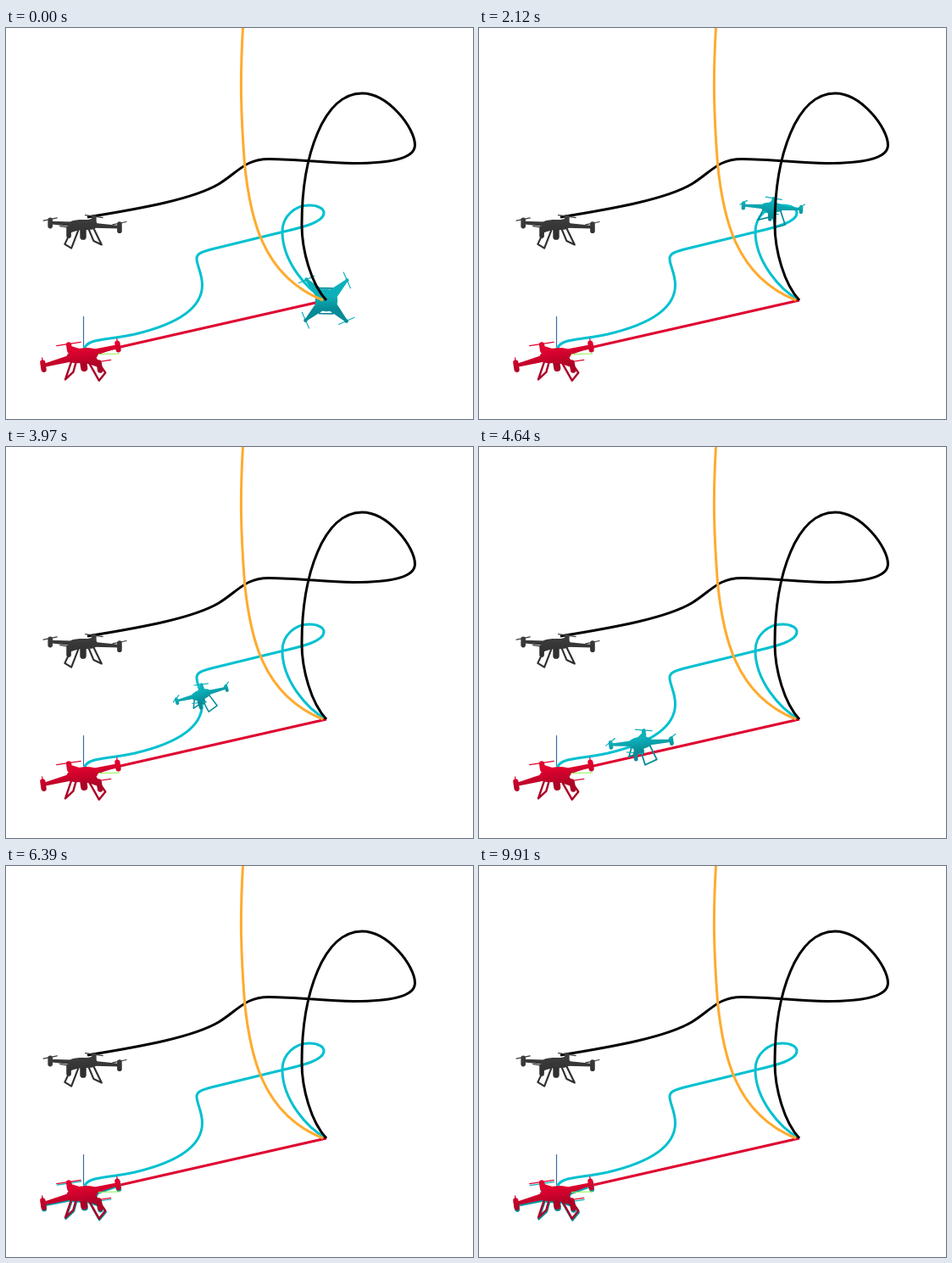
These frames come from a looping animation (551 px wide and 461 px high, 9.97 s). An HTML page with a canvas:

```html
<!DOCTYPE html>
<html lang="en">
<head>
<meta charset="utf-8">
<title>Drone trajectories</title>
<style>
html, body { margin: 0; width: 551px; height: 461px; overflow: hidden; background: #fff; }
canvas { display: block; }
</style>
</head>
<body>
<canvas id="stage" width="551" height="461"></canvas>
<script>
const ctx = document.getElementById('stage').getContext('2d');
const LOOP = 9970, DEG = Math.PI / 180;
const CYAN = { body: '#0db0ba', dark: '#078b96' };
const RED = { body: '#e0032f', dark: '#ab0226' };
const GREY = { body: '#3c3c3c', dark: '#303030' };

const flightPath = 'M378 321C355 309 326 275 326 240C326 222 341 209 358 209C368 209 375 213 375 218' +
  'C375 230 345 236 326 240.5L242 261C231 264 225 266 225 272C225 280 231.5 289 231.5 303' +
  'C231.5 335 190 352 152 361C130 365.5 112 367 103 369.5C95 372 91 376 90.5 388';
const flight = document.createElementNS('http://www.w3.org/2000/svg', 'path');
flight.setAttribute('d', flightPath);
const flightLength = flight.getTotalLength();

const tracks = {
  cyan: [flightPath, '#00c0d0'],
  red: ['M91 386L378 321', '#df0330'],
  black: ['M378 321C360 302 349 262 349 232C349 150 375 77 420 77C451 77 482.5 118 482.5 138' +
    'C482.5 155 450 159.5 410 159.5C375 159 345 154.5 310 154.5C282 154.5 274 170 251 184C222 201 165 212 96 223', '#000'],
  orange: ['M279.5 0C276 60 277 100 281.5 160C287.5 220 301 292 374 321', '#ffab2e']
};

// Attitude: radius, yaw, tilt towards the viewer, roll (degrees)
const redPose = [48, -19.5, 17.5, -8.6];
const greyPose = [43.5, -70, 10, 0];
// [time, distance flown, ...attitude]
const keys = [
  [1000, 0, 34, 46, 88, 0],
  [1390, 58, 33, 28, 24, 9],
  [2820, 213, 34.7, -13, 20, -5],
  [3970, 356, 30.5, 8, 20, -17.5],
  [5270, 493, 43, 7, 22, 1.4],
  [6400, flightLength, ...redPose]
];

// Smooth curve through timed rows, held at both ends
function sample(rows, time) {
  const last = rows.length - 1;
  const t = Math.min(Math.max(time, rows[0][0]), rows[last][0]);
  const i = Math.max(rows.findIndex(r => r[0] >= t) - 1, 0);
  const a = rows[i], b = rows[i + 1];
  const before = rows[Math.max(i - 1, 0)], after = rows[Math.min(i + 2, last)];
  const span = b[0] - a[0], p = (t - a[0]) / span, q = 1 - p;
  const slope = (from, to, k) => (to[k] - from[k]) / (to[0] - from[0]) * span;
  return a.map((_, k) => q * q * (1 + 2 * p) * a[k] + p * q * q * slope(before, b, k) +
    p * p * (3 - 2 * p) * b[k] - p * p * q * slope(a, after, k)).slice(1);
}

function line(points, color, width) {
  ctx.beginPath();
  points.forEach(p => ctx.lineTo(...p));
  ctx.strokeStyle = color;
  ctx.lineWidth = width;
  ctx.stroke();
}

function track(name) {
  const [path, color] = tracks[name];
  ctx.strokeStyle = color;
  ctx.lineWidth = 3;
  ctx.stroke(new Path2D(path));
}

function drone(x, y, [radius, yaw, tilt, roll], { body, dark }) {
  const sin = Math.sin(tilt * DEG), cos = Math.cos(tilt * DEG);
  // Polar model point (z down) to the screen, nearer parts a little larger
  const at = (r, angle, z = 0) => {
    const a = (angle + yaw) * DEG, px = r * Math.cos(a), py = r * Math.sin(a);
    const k = radius * (1 + 0.15 * py * cos);
    return [px * k, (py * sin + z * cos) * k];
  };
  const fill = points => {
    ctx.beginPath();
    points.forEach(p => ctx.lineTo(...p));
    ctx.closePath();
    ctx.fill();
    ctx.stroke();
  };
  ctx.save();
  ctx.translate(x, y);
  ctx.rotate(roll * DEG);
  ctx.lineCap = ctx.lineJoin = 'round';

  for (const side of [45, 225]) {
    const leg = [at(0.3, side - 40, 0.1), at(0.5, side - 28, 0.54), at(0.5, side + 28, 0.54), at(0.3, side + 40, 0.1)];
    line(leg, dark, 0.05 * radius);
  }
  line([[0, 0], at(0, 0, 0.33)], dark, 0.17 * radius);

  const shade = ctx.createLinearGradient(0, -0.15 * radius, 0, 0.3 * radius);
  shade.addColorStop(0, body);
  shade.addColorStop(1, dark);
  const star = [], disc = [];
  for (let a = 0; a < 360; a += 90) {
    const [hx, hy] = at(1, a, -0.1), [bx, by] = at(0.3, a % 180 ? 20 : 110);
    line([[hx - bx, hy - by], [hx + bx, hy + by]], body, 1.2);
    line([at(1, a, -0.08), at(1, a, 0.1)], shade, 0.13 * radius);
    star.push(at(1, a), at(0.24, a + 45));
  }
  for (let a = 0; a < 360; a += 15) disc.push(at(0.3, a));
  ctx.fillStyle = ctx.strokeStyle = shade;
  ctx.lineWidth = 0.08 * radius;
  fill(star);
  ctx.lineWidth = 0.18 * radius;
  fill(disc);
  ctx.restore();
}

function draw() {
  const t = performance.now() % LOOP;
  const [distance, ...pose] = sample(keys, t);
  const spot = flight.getPointAtLength(distance);
  const cyanDrone = () => drone(spot.x, spot.y, pose, CYAN);
  const redDrone = () => drone(90, 386, redPose, RED);
  ctx.fillStyle = '#fff';
  ctx.fillRect(0, 0, 551, 461);

  track('cyan');
  track('red');
  const order = [redDrone, cyanDrone];
  if (t > 5900) order.reverse();
  order.forEach(paint => paint());
  track('black');
  track('orange');
  drone(91, 232, greyPose, GREY);

  line([[91.5, 340], [91.5, 376]], '#3b6ea8', 1.2);
  line([[109, 384.5], [134, 384]], '#8ff04a', 1.2);
  requestAnimationFrame(draw);
}
draw();
</script>
</body>
</html>
```
